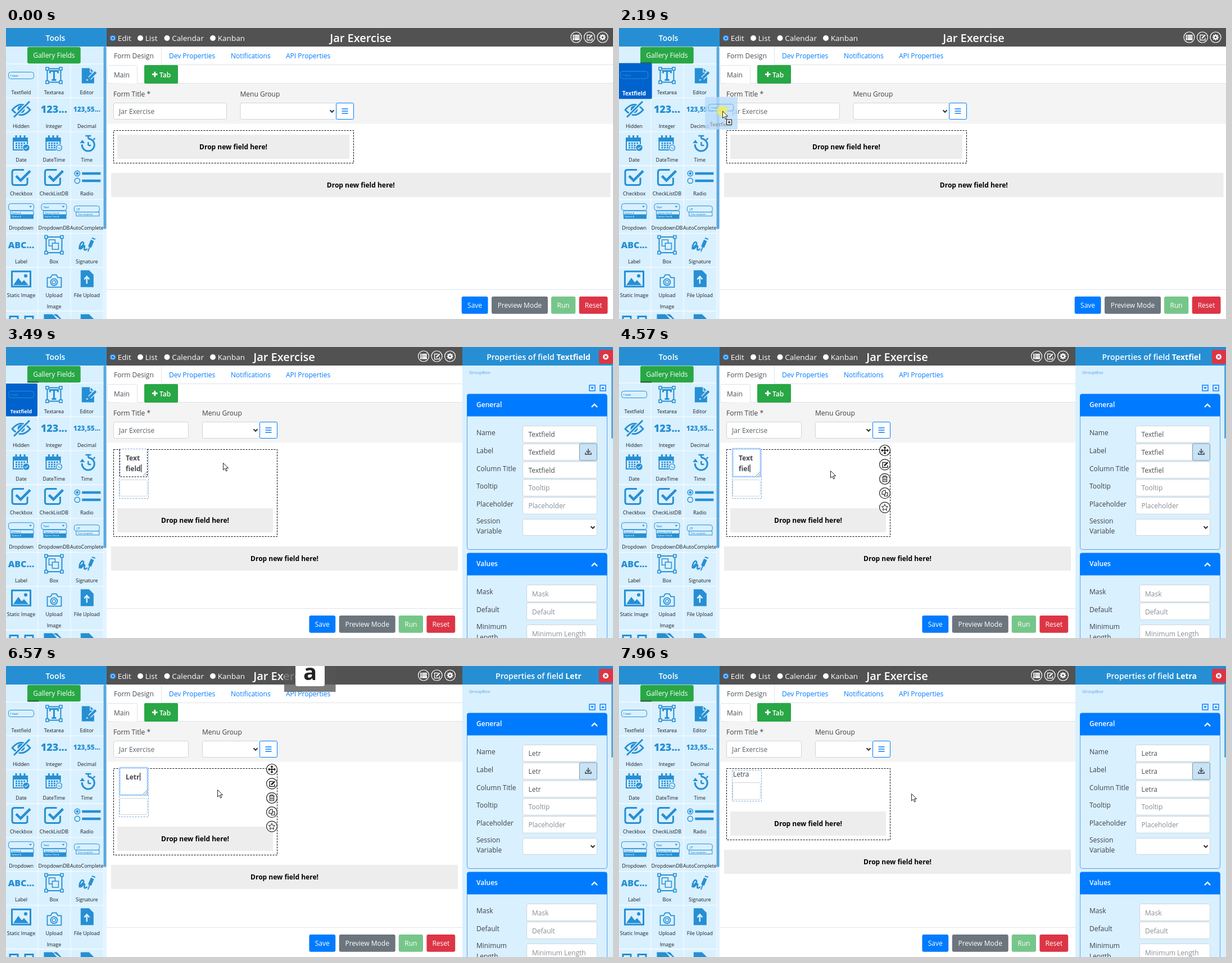
Animation of 1080 by 518 pixels, one loop 8000 ms. Source, as an HTML page:

```html
<!DOCTYPE html>
<html lang="en">
<head>
<meta charset="utf-8">
<title>Form designer</title>
<style>
html, body { margin: 0; width: 100%; height: 100%; overflow: hidden; background: #fff; }
svg { display: block; width: 100%; height: 100%; font-family: "Open Sans", "Noto Sans", sans-serif; }
</style>
</head>
<body>
<svg id="stage" viewBox="0 0 1080 518"><g id="tools"></g><g id="tiles"></g><g id="page"></g><g id="pointer"></g></svg>
<script>
const LOOP = 8000, TITLE = 'Jar Exercise';
const BLUE = '#268fd3', PALE = '#d9f0ff', PRIMARY = '#007bff', INK = '#3c4146', GREEN = '#28a745';
const $ = id => document.getElementById(id);

// Drawing helpers
const rect = (x, y, w, h, fill, extra = '') =>
  `<rect x="${x}" y="${y}" width="${w}" height="${h}" fill="${fill}" ${extra}/>`;
const path = (d, stroke, width = 1, fill = 'none', extra = '') =>
  `<path d="${d}" stroke="${stroke}" stroke-width="${width}" fill="${fill}" ${extra}/>`;
const circle = (x, y, r, fill, stroke = 'none', width = 1, opacity = 1) =>
  `<circle cx="${x}" cy="${y}" r="${r}" fill="${fill}" stroke="${stroke}" stroke-width="${width}" opacity="${opacity}"/>`;
const text = (x, y, s, fill = INK, size = 12, weight = 400, anchor = 'start') =>
  `<text x="${x}" y="${y}" fill="${fill}" font-size="${size}" font-weight="${weight}" text-anchor="${anchor}">${s}</text>`;
const group = (x, y, body, extra = '') => `<g transform="translate(${x} ${y}) ${extra}">${body}</g>`;
const outline = (x, y, w, h, stroke, extra = '', fill = 'none') =>
  rect(x + .5, y + .5, w - 1, h - 1, fill, `stroke="${stroke}" ${extra}`);
const input = (x, y, w, h = 30) => outline(x, y, w, h, '#ced4da', 'rx="3"', '#fff');
const button = (x, y, w, h, fill, label) =>
  rect(x, y, w, h, fill, 'rx="3"') + text(x + w / 2, y + h / 2 + 4.5, label, '#fff', 12, 400, 'middle');
const chevron = (x, y, dir, size, color, width) =>
  path(`M${x - size} ${y - dir * size / 2}l${size} ${dir * size}l${size} ${-dir * size}`, color, width);
const bars = (x, y, w, color, width = 1.6) =>
  path(`M${x - w / 2} ${y - 4}h${w}m${-w} 4h${w}m${-w} 4h${w}`, color, width);

// Timing helpers
const at = (t, steps) => steps.reduce((value, [time, next]) => t >= time ? next : value, steps[0][1]);
function along(t, keys) {
  let i = 0;
  while (i < keys.length - 2 && t >= keys[i + 1][0]) i++;
  const [a, b] = [keys[i], keys[i + 1]];
  const k = Math.min(1, Math.max(0, (t - a[0]) / (b[0] - a[0])));
  return a.slice(1).map((v, n) => v + (b[n + 1] - v) * k);
}
const mix = (a, b, k) => `rgb(${a.map((v, i) => Math.round(v + (b[i] - v) * k))})`;

// Icons, centred on the origin
const bold = (s, size, y) => text(0, y, s, BLUE, size, 800, 'middle');
const fieldIcon = rect(-22.5, -6, 45, 12, 'none', `rx="4" stroke="${BLUE}"`) + text(-19, 2, 'I text', BLUE, 5.5, 600);
const frame = r => rect(-r, -r, 2 * r, 2 * r, 'none', `stroke="${BLUE}" stroke-width="2"`) +
  [-r, r].flatMap(x => [-r, r].map(y => rect(x - 2.5, y - 2.5, 5, 5, PALE, `stroke="${BLUE}" stroke-width="1.6"`))).join('');
const calendar = path('M-14 -9h25v21h-25z', BLUE, 2) + rect(-15, -10, 27, 7, BLUE) +
  path('M-9 -14v6M-1.5 -14v6M6 -14v6', BLUE, 3) + path('M-10 0h18M-10 4h18M-10 8h18', BLUE, 2.6, 'none', 'stroke-dasharray="3 1.7"');
const badge = circle(9, 8, 6.7, PALE) + circle(9, 8, 5.7, BLUE);
const checkbox = path('M11 1v9q0 4 -4 4h-19q-4 0 -4 -4v-19q0 -4 4 -4h17', BLUE, 3) + path('M-9 -2l8 8l17 -17', BLUE, 4.5);
const dropdown = (first, rows) => rect(-22.5, -13, 45, 12, 'none', `rx="4" stroke="${BLUE}"`) +
  text(-19, -5, first, BLUE, 5, 600) + path('M14 -9h5l-2.5 3z', 'none', 0, BLUE) + rect(-19, 0, 41, 7, 'none', `stroke="${BLUE}"`) +
  rect(-19, 6, 41, 8, BLUE) + text(-17, 5, rows, BLUE, 4, 600) + text(-17, 11.5, rows, PALE, 4, 600);
const page = path('M-11 -15h15l8 8v22h-23z', 'none', 0, BLUE);
const overlapSquare = p => rect(p, p, 11, 11, PALE, `stroke="${BLUE}" stroke-width="1.5"`);

const TILES = [
  ['Textfield', fieldIcon],
  ['Textarea', frame(12) + path('M-7 -4v-4h14v4M0 -8v16M-4 8h8', BLUE, 3)],
  ['Editor', path('M-9 -13h15l7 7v20h-22z', 'none', 0, BLUE) + path('M6 -14v8h8', PALE, 1.4) +
    path('M5 5l9 -9', PALE, 7) + path('M5 5l11 -11', BLUE, 4.2) + rect(-1, 7, 3, 2, PALE)],
  ['Hidden', path('M-16 1q16 -19 32 0q-16 18 -32 0z', BLUE, 2.8) + circle(0, 0, 6.5, BLUE) + path('M15 -14l-27 27', PALE, 6) + path('M15 -14l-28 28', BLUE, 3)],
  ['Integer', bold('123...', 18, 6)],
  ['Decimal', bold('123,55...', 11.7, 4)],
  ['Date', calendar + badge + path('M6 8l2 2l4 -4', PALE, 1.3)],
  ['DateTime', calendar + badge + circle(9, 8, 4.4, PALE) + path('M6.5 7l2.5 2h3', BLUE, 1)],
  ['Time', group(2.5, 3, path('M-11 -1A11 11 0 1 0 0 -11', BLUE, 3) + path('M-5 -16h10M0 -16v5M9 -9l3 -3M0 1v-6M0 1h5', BLUE, 2.5) +
    path('M-15 -3l4.5 -6l4.5 6z', 'none', 0, BLUE))],
  ['Checkbox', checkbox],
  ['CheckListDB', checkbox],
  ['Radio', [-6.5, 6.5].map(y => circle(-17, y, 4.6, 'none', BLUE, 1.5)).join('') + circle(-17, -6.5, 2.3, BLUE) + path('M-8.5 -6.5h33M-8.5 6.5h33', BLUE, 4.5)],
  ['Dropdown', dropdown('', 'Option A')],
  ['DropdownDB', dropdown('Text', 'Option Text A')],
  ['AutoComplete', rect(-22.5, -9, 45, 11, 'none', `rx="4" stroke="${BLUE}"`) + text(-19, -1, '|T', BLUE, 6, 700) + rect(-19, 2, 41, 7, PALE, `stroke="${BLUE}"`) + text(-16, 7.3, 'Text complete', BLUE, 4, 600)],
  ['Label', bold('ABC...', 16, 6)],
  ['Box', frame(14) + overlapSquare(-9) + overlapSquare(-3)],
  ['Signature', path('M-13 8c-1 -7 4 -16 7 -12c3 4 -8 9 -6 11c3 2 6 -7 8 -5c1 2 -2 6 0 7c2 1 3 -2 5 -1', BLUE, 2.6) + path('M5 4l5 -12', BLUE, 6) + path('M9 -12l6 2M5 4l-3 8', BLUE, 2)],
  ['Static Image', rect(-18, -14.5, 36, 30, BLUE, 'rx="1"') + rect(-15, -11.5, 30, 24, PALE) + circle(8, -5, 3, BLUE) + path('M-14 11.5l9 -13l6 8l4 -4l8 9z', 'none', 0, BLUE)],
  ['Upload', group(0, 3, path('M-12 -5h6l3 -5h7l3 5h6v17h-25z', BLUE, 1.8, 'none', 'stroke-linejoin="round"') + circle(0, 3, 6, 'none', BLUE, 1.8) + circle(0, 3, 3, 'none', BLUE, 1.3))],
  ['File Upload', page + path('M0 9v-12M-4.5 1l4.5 -5l4.5 5', PALE, 2.5)],
  ['', path('M-20 -11h14v14h-14zM7 -11h14v14h-14z', BLUE, 3)],
  ['', path('M-17 -14h14l9 10l-14 14l-9 -9zM0 -14h5l9 10', BLUE, 2, BLUE)],
  ['', page + path('M-4 -5h5', PALE, 2)]
];
const tilePos = i => [(i % 3) * 58.4, 65 + Math.floor(i / 3) * 60.3 + (i > 20 ? 18 : 0)];

function tile(i, heat = 0, scale = 1) {
  const [x, y] = tilePos(i), [label, icon] = TILES[i];
  const body = rect(-1, 0, 57, i > 17 && i < 21 ? 76 : 58.5, mix([217, 240, 255], [0, 98, 204], heat), 'rx="2"') +
    group(27, 19.5, icon) +
    text(27, 52.5, label, mix([24, 28, 32], [255, 255, 255], heat), 8.9, heat > .7 ? 700 : 400, 'middle') +
    (label === 'Upload' ? text(27, 72, 'Image', '#181c20', 8.9, 400, 'middle') : '');
  return group(x, y, group(27, 29, group(-27, -29, body), `scale(${scale})`));
}

$('tools').innerHTML = rect(0, 0, 179, 518, PALE) + rect(0, 63, 174, 455, '#eef9ff') + rect(0, 0, 179, 33, BLUE) +
  text(88, 23, 'Tools', '#fff', 14, 600, 'middle') + button(38, 33.7, 94.7, 29.6, GREEN, 'Gallery Fields');

function sidebar(t) {
  const heat = along(t, t < 2000 ? [[1245, 0], [1260, .15], [1320, 1]] : [[3600, 1], [3760, 0]])[0];
  const scale = t > 1300 && t < 3490 ? 1.09 : 1;
  const passing = t < 1130 ? along(t, [[1000, 0], [1120, .6]])[0] : along(t, [[1120, .6], [1250, 0]])[0];
  let out = t >= 1260 ? rect(38, 61, 20, 2.5, '#296b3c') : '';
  TILES.forEach((_, i) => { if (i) out += tile(i, i === 4 ? passing : 0, i === 4 && passing > .2 ? 1.06 : 1); });
  return out + tile(0, heat, scale) + rect(173.5, 33, 5.5, 485, '#e4f4ff') + rect(173.5, 33, 5, 325, '#58a8de', 'rx="2.5"');
}

// Page parts
const pencil = c => path('M2 -4h-6v9h9v-4', c, 1.3) + path('M-1 2l6 -6', c, 2.4);

function toolbar(narrow, right) {
  const mid = narrow ? 495 : 631, icons = narrow ? 743 : 1014.5, gear = icons + 47;
  let out = rect(179, 0, right - 179, 33, '#525252');
  [[190, 'Edit'], [239, 'List'], [286.5, 'Calendar'], [368, 'Kanban']].forEach(([x, label], i) => {
    out += circle(x, 18, 5, '#fff') + (i ? '' : circle(x, 18, 4.2, '#fff', PRIMARY, 1.4) + circle(x, 18, 2.6, PRIMARY)) +
      text(x + 8.8, 23, label, '#fff', 13.5);
  });
  out += text(mid, 25, TITLE, '#fff', 20, 600, 'middle');
  for (let i = 0; i < 3; i++) out += circle(icons + i * 23.5, 16.5, 9.5, 'none', '#fff', 1.2);
  return out + rect(icons - 6, 12, 12, 9.5, '#fff') + path(`M${icons - 6} 14.5h12m-12 3h12m-9 -6v10`, '#525252', .7) +
    group(icons + 23.5, 16.5, pencil('#fff')) + path(`M${gear} 11v11m-5.5 -5.5h11m-9.5 -4l8 8m0 -8l-8 8`, '#fff', 1.8) +
    circle(gear, 16.5, 4, '#fff') + circle(gear, 16.5, 1.7, '#525252');
}

function tabs(right) {
  const grey = '#dee2e6';
  let out = path(`M276.5 33v32.5H${right}M180 98.5H${right}`, grey) + rect(179, 99, right - 179, 71.5, '#f4f4f4') +
    path('M180.5 98V68.5q0 -2 2 -2h49q2 0 2 2V99', grey, 1, '#fff') +
    text(192, 54, 'Form Design', '#495057') + text(192, 87.5, 'Main', '#495057') +
    rect(246, 66, 60, 33, GREEN, 'rx="2"') + path('M260 82.5h9.5m-4.75 -4.75v9.5', '#fff', 2.8) + text(273, 87.5, 'Tab', '#fff', 12, 600);
  [[290, 'Dev Properties'], [400, 'Notifications'], [498, 'API Properties']].forEach(([x, s]) => { out += text(x, 54, s, PRIMARY); });
  return out;
}

function header(narrow) {
  const end = narrow ? 483 : 619, menu = narrow ? 349 : 416.5, width = narrow ? 134 : 202;
  return text(191, 122, 'Form Title *') + text(menu, 122, 'Menu Group') + input(191, 133, width) +
    text(201, 153, TITLE, '#5a6168') + input(menu, 133, end - 31 - menu) + chevron(end - 39, 148, 1, 3.5, '#333', 2) +
    outline(end - 32, 133, 32, 30, PRIMARY, 'rx="2"', '#fff') + bars(end - 16, 148, 11, PRIMARY);
}

function dropZone(x, y, w) {
  return rect(x, y, w, 43, '#ededed') + text(x + w / 2, y + 25.5, 'Drop new field here!', '#000', 12, 700, 'middle');
}

function footer(narrow, right, hover) {
  const s = narrow ? -271.3 : 0;
  return path(`M179 465.5H${right}`, '#dbe5ec') + button(810.7 + s, 478, 46.8, 30.7, PRIMARY, 'Save') +
    button(864 + s, 478, 100, 30.7, hover ? '#5a6268' : '#6c757d', 'Preview Mode') +
    button(970 + s, 478, 43.3, 30.7, '#76c68a', 'Run') + button(1019.7 + s, 478, 50.8, 30.7, '#dc3545', 'Reset');
}

const ruler = document.createElement('canvas').getContext('2d');
function measure(s) {
  ruler.font = '700 12px "Open Sans", "Noto Sans", sans-serif';
  return ruler.measureText(s).width;
}

function field(label, shift, focus, blurred) {
  const dash = 'stroke-dasharray="3 2"', soft = '#7aa7e0';
  if (blurred) return outline(201, 185, 53, 56, soft, dash) + text(203, 196.5, label) + input(202, 207, 50, 31);
  const lines = [label.slice(0, 4), label.slice(4)].filter(Boolean), h = 50 + Math.max(-1, shift);
  const caretX = 213 + measure(lines[lines.length - 1] || ''), caretY = lines.length > 1 ? 209 : 190;
  const corner = 181 + h;
  return outline(201, 181, 53, 89 + shift, soft, dash) +
    (focus ? rect(202, 181, 50, h, '#fff', 'rx="2" stroke="#bfdeff" stroke-width="3"') + outline(202, 181, 50, h, '#6fa9ea', dash)
           : rect(202, 182, 50, h, '#fff') + path(`M202.5 182v${h - 1}h49v${1 - h}`, '#000', 1, 'none', dash)) +
    path(`M244 ${corner - 2}l7 -7m-3 7l3 -3`, '#666', .8) +
    lines.map((s, i) => text(213, 202 + i * 19, s, '#40474e', 12, 700)).join('') +
    rect(caretX + .5, caretY, 1, 14, '#000') + input(202, 236 + shift, 50);
}

function actions() {
  const art = [
    path('M-6 0h12M0 -6v12M-4 -2l-2 2l2 2M4 -2l2 2l-2 2M-2 -4l2 -2l2 2M-2 4l2 2l2 -2', '#111', 1.4),
    pencil('#111'),
    path('M-5 -3.5h10M-2 -4v-1.5h4v1.5M-3.5 -3v8h7v-8M-1.2 -1v4M1.2 -1v4', '#111', 1.1),
    path('M-5 -2l3 -3h3v7h-6zM1 -1h4v6h-6v-3', '#111', 1.1),
    path('M0 -5.5l1.6 3.6l4 .4l-3 2.7l.9 4l-3.5 -2l-3.5 2l.9 -4l-3 -2.7l4 -.4z', '#111', 1)
  ];
  return art.map((a, i) => group(473, 184 + i * 25.4, circle(0, 0, 9.5, '#fff', '#222', 1.2) + a)).join('');
}

function properties(name) {
  let out = rect(812, 0, 268, 518, PALE) + rect(812, 0, 268, 33, BLUE) +
    `<text x="947.5" y="23" fill="#fff" font-size="14" font-weight="600" text-anchor="middle">Properties of field <tspan font-weight="700">${name}</tspan></text>` +
    rect(1055, 5, 25, 25, '#dc3545', 'rx="3"') + circle(1067, 17.5, 5, '#fff') + path('M1065 15.5l4 4m0 -4l-4 4', '#dc3545', 1.5) +
    text(824, 48, 'GroupBox', '#549fe8', 8) + rect(1077, 33, 3, 130, '#58a8de', 'rx="1.5"');
  [[1043, 1], [1062, -1]].forEach(([x, dir]) => {
    out += outline(x - 5.5, 67.5, 11, 11, PRIMARY, 'stroke-width="1.4"') + path(`M${x - 3} ${73 - dir * 1.5}h6l-3 ${dir * 3.5}z`, 'none', 0, PRIMARY);
  });
  [[84, 277, 'General'], [367, 170, 'Values']].forEach(([y, h, label]) => {
    out += outline(820, y, 250, h, '#5b9fe6', 'rx="4"') + path(`M820 ${y + 39.5}v-36q0 -4 4 -4h241.5q4 0 4 4v36z`, 'none', 0, PRIMARY) +
      text(837, y + 23, label, '#fff', 12, 600) + chevron(1047, y + 20.5, -1, 5, '#fff', 2.4);
  });
  ['Name', 'Label', 'Column Title', 'Tooltip', 'Placeholder'].forEach((label, i) => {
    const y = 140 + i * 31.8, value = i < 3 && name;
    out += text(837, y + 17, label) + input(919, y, 133, 30.5) + text(929.5, y + 20, value || label, value ? '#495057' : '#868e96');
  });
  out += outline(1020, 171.5, 32, 31, '#7d97aa', 'rx="2"', '#c9e3f5') +
    path('M1036 181v6M1032.5 185l3.5 3.5l3.5 -3.5M1031 188v3h10v-3', '#5b6670', 2) +
    text(837, 313.5, 'Session') + text(837, 332, 'Variable') + input(919, 306, 133) + chevron(1044, 321, 1, 3.5, '#333', 2);
  [['Mask', 423], ['Default', 455], ['Minimum', 494]].forEach(([label, y], i) => {
    out += text(837, i < 2 ? y + 17 : 502, label) + input(926, y, 126, 31) +
      text(936, y + 20.5, i < 2 ? label : 'Minimum Length', '#868e96');
  });
  return out + text(837, 520.5, 'Length');
}

const keycap = key => rect(495, 0, 91.5, 46, '#555', 'opacity=".78"') +
  path('M515 0h52v32q0 4 -4 4h-44q-4 0 -4 -4z', 'none', 0, '#fff') + text(541, 24.5, key, '#222', 40, 700, 'middle');

// Timeline
const LABEL = [[0, 'Textfield'], [4570, 'Textfiel'], [5080, 'Textfi'], [5150, 'Text'], [5220, 'Te'], [5290, ''],
  [5970, 'L'], [6300, 'Le'], [6510, 'Let'], [6570, 'Letr'], [6640, 'Letra']];
const KEYS = [[0, ''], [5750, 'L'], [6300, 'e'], [6510, 't'], [6570, 'a'], [7180, '']];
const BLUR = 7500, PRESS = 1900, DRAG = 1990, DROP = 3270;
const SHIFT = [[0, -97], [3490, 0], [5490, -1], [6640, 18], [6970, 37], [BLUR, -28]];
const PATH = [[380, 905, 500], [700, 560, 340], [1120, 41, 118], [1260, -2, 90], [1320, -3, 84], [1500, -3, 84], [1520, -3, 79],
  [1720, -3, 79], [1850, 30, 87], [1960, 30, 87], [2200, 190, 150], [2530, 345, 241], [2670, 355, 259], [2800, 362, 252],
  [3100, 385, 208], [3290, 386, 206], [3490, 386, 206], [3900, 376, 220], [7040, 376, 220], [7350, 500, 221],
  [7700, 548, 222], [7930, 548, 222], [7960, 520, 227]];

function canvasArea(t) {
  const narrow = t >= 3490, right = narrow ? 812 : 1080, shift = at(t, SHIFT), end = narrow ? 483 : 619;
  const label = at(t, LABEL), name = t >= 6640 && t < 6970 ? 'Letr' : label;
  const [x, y] = along(t, PATH);
  const over = t > DRAG && t < DROP && x > 179 && y > 171 && y < 250;
  let out = rect(179, 0, right - 179, 518, '#fff') + toolbar(narrow, right) + tabs(right) + header(narrow);
  if (over) out += rect(179, 171, 452, 79, '#f6f6f6');
  out += outline(191, 182, end - 191, 156 + shift, '#000', 'stroke-dasharray="3 2"') +
    dropZone(198, 287 + shift, end - 8 - 198) + dropZone(187, 355 + shift, narrow ? 617 : 888.5);
  if (narrow) out += field(label, shift, t >= 3560, t >= BLUR) + (t >= 3640 && x < 495 ? actions() : '') + properties(name);
  const key = at(t, KEYS);
  return out + footer(narrow, right, t >= 380 && t < 440) + (key && keycap(key));
}

function pointer(t) {
  if (t < 380) return '';
  const [x, y] = along(t, PATH), dragging = t > DRAG && t < DROP;
  let out = '';
  if (dragging) out += group(x - 31, y - 25, rect(0, 0, 58, 58, '#b9dcfb', 'rx="2" opacity=".8"') +
    `<g opacity=".6">${group(28.5, 19, fieldIcon)}${text(28, 52, 'Textfield', '#666', 9.5, 600, 'middle')}</g>`);
  if (t > PRESS && t < DROP) out += circle(x - .5, y, 9.5, '#f5ee55', 'none', 0, .8);
  out += group(x, y, path('M.5 .5v12.5l3 -2.8l2.2 4.8l2 -1l-2.2 -4.5h4.2z', '#222', 1, '#fff'));
  if (dragging) out += group(x + 12, y + 20, rect(-4.5, -4.5, 9, 9, '#fff', 'stroke="#111"') + path('M-2.5 0h5M0 -2.5v5', '#111', 1.2));
  return out;
}

function draw(t) {
  $('tiles').innerHTML = sidebar(t);
  $('page').innerHTML = canvasArea(t);
  $('pointer').innerHTML = pointer(t);
}

const start = performance.now();
function tick(now) {
  draw(Math.max(0, now - start) % LOOP);
  requestAnimationFrame(tick);
}
draw(0);
requestAnimationFrame(tick);
</script>
</body>
</html>
```
